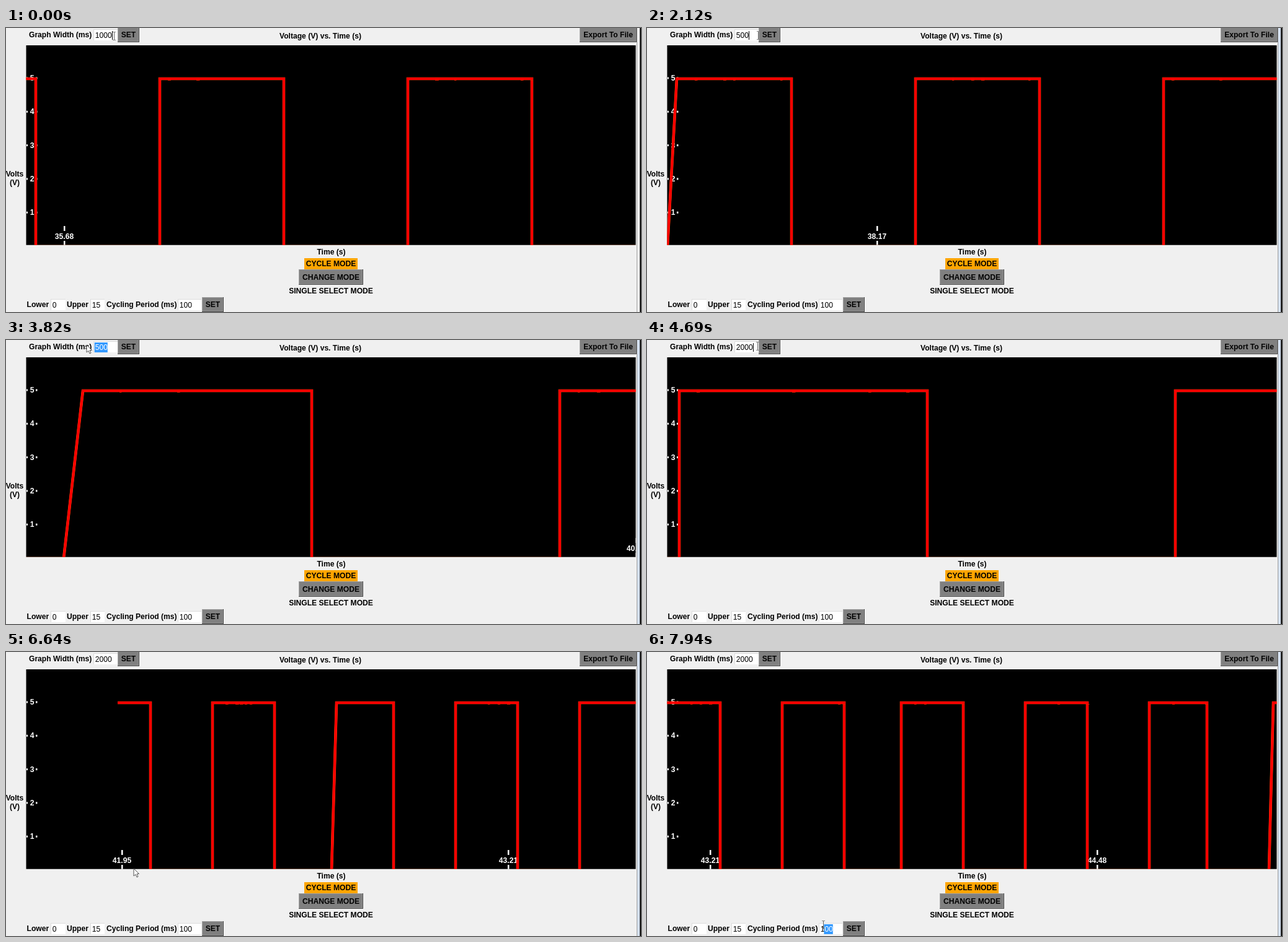
Animation of 1024x459 px, one loop 8 s. Source, as an HTML page with a canvas:

```html
<!DOCTYPE html>
<html lang="en">
<head>
<meta charset="utf-8">
<title>Voltage graph</title>
<style>
html, body { margin: 0; width: 100%; height: 100%; overflow: hidden; background: #f0f0f0; }
canvas { display: block; }
</style>
</head>
<body>
<canvas id="stage" width="1024" height="459"></canvas>
<script>
const c = document.getElementById('stage').getContext('2d');
const LOOP = 8000, RIGHT = 1015, TOP = 82, BASE = 353;
const SAMPLE = 1000 / 65;                 // ms between readings
const KEY = 85, TRAVEL = 460, DIGIT = 6.7;
const FONT = '12.1px "Liberation Sans", Arial, sans-serif';

// Key points: screen time, signal time at the right edge of the plot
const PROGRESS = [[0, 921], [1010, 1998], [2120, 3136], [3820, 4984],
  [5120, 6247], [5580, 6795], [6640, 7887], [7940, 9302]];

// Each edit selects the old width, types a new one, then SET clears the plot at signal time `from`.
const EDITS = [
  { text: '1000', drag: -900, type: -255, set: -100, from: -400 },
  { text: '500', drag: 350, type: 1500, set: 2490, from: 3546 },
  { text: '2000', drag: 3250, type: 3940, set: 5119, from: 6216 },
];

// Pointer stops, with the time of arrival
const FIELD = [174, 13], LEFT = [130, 8], SET = [190, 10];
const STOPS = [[0, FIELD], [800, LEFT], [1900, FIELD], [2400, SET], [3080, FIELD], [3680, LEFT],
  [4800, SET], [6640, [206, 350]], [7100, [300, 446]], [7940, [284, 441]]];

// Signal edges, falling first: 13 readings per half, with a few lost as the clock drifts.
const lost = i => i < 18 ? 0 : Math.max(2, Math.floor(.18 * i - 3.279));
const edges = Array.from({ length: 50 }, (_, i) => (13 * i - lost(i)) * SAMPLE - 46);
const isSloped = i => i % 12 === 11;
const isHigh = p => edges.filter(e => e <= p).length % 2 === 0;

const stamp = k => (Math.floor(3568.8 + 124.05 * k + .24 * k * k) / 100).toFixed(2);
const latest = (t, event) => EDITS.filter(e => e[event] <= t).pop();

// Screen time held to the recording's steps, and the signal time it shows
function progress(t) {
  const i = PROGRESS.findIndex(k => k[0] > t);
  if (i < 0) return PROGRESS[PROGRESS.length - 1];
  const [a, p] = PROGRESS[i - 1], [b, q] = PROGRESS[i];
  const steps = Math.round((b - a) / 63.5);
  const u = Math.floor((t - a) / (b - a) * steps + 1e-6) / steps;
  return [a + (b - a) * u, p + (q - p) * u];
}

function pointer(t) {
  const i = STOPS.findIndex(s => s[0] > t);
  if (i < 0) return STOPS[STOPS.length - 1][1];
  const [arrive, to] = STOPS[i], from = STOPS[i - 1][1];
  const u = Math.max(0, 1 - (arrive - t) / TRAVEL);
  return from.map((v, j) => v + (to[j] - v) * u * u * (3 - 2 * u));
}

function rect(x, y, w, h, color) {
  c.fillStyle = color;
  c.fillRect(x, y, w, h);
}

function text(s, x, y, align = 'left', color = '#000', weight = 'bold ') {
  c.font = weight + FONT;
  c.textAlign = align;
  c.fillStyle = color;
  c.fillText(s, x, y);
}

function button(label, x, y, w, h, pressed) {
  const [light, dark] = pressed ? ['#484848', '#a0a0a0'] : ['#a0a0a0', '#484848'];
  rect(x, y, w, h, dark);
  rect(x, y, w - 1, h - 1, light);
  rect(x + 1, y + 1, w - 2.5, h - 2.5, '#808080');
  text(label, x + w / 2, y + h / 2 + 4, 'center');
}

function entry(value, x, y, w) {
  rect(x, y, w, 18, '#dcdcdc');
  rect(x + 1, y + 1, w - 1, 17, '#fff');
  text(value, x + 2.7, y + 14, 'left', '#000', '');
}

// Highlights the digits between the pointer and the end of the value
function select(value, px, x, y) {
  const from = Math.max(0, Math.min(value.length, Math.round((px - x) / DIGIT)));
  const left = x + from * DIGIT;
  rect(left - 1, y, (value.length - from) * DIGIT + 1, 16, '#3399ff');
  text(value.slice(from), left, y + 12, 'left', '#fff', '');
}

function drawPlot(t, now) {
  const { text: span, from } = latest(t, 'set');
  const X = p => Math.round(RIGHT - (now - p) * 1000 / span);

  c.save();
  c.beginPath();
  c.rect(32.5, 28, 983, 322.7);
  c.clip();
  rect(32, 28, 984, 323, '#000');

  for (let v = 1; v <= 5; v++) {
    const y = 352.5 - v * 54.3;
    rect(33, y - 1.5, 2, 3, '#fff');
    rect(48, y - 1.5, 2.5, 3, '#fff');
    text(v, 42, y + 4, 'center', '#fff');
  }

  for (let k = 0; k < 8; k++) {
    const p = k * 81 * SAMPLE, x = X(p);
    if (p < from) continue;
    rect(x - 1, 320, 2.5, 8, '#fff');
    rect(x - 1, 344, 2.5, 8, '#fff');
    text(stamp(k), x, 341, 'center', '#fff');
  }

  let y = isHigh(from) ? TOP : BASE;
  c.beginPath();
  c.moveTo(X(from), y);
  edges.forEach((e, i) => {
    if (e <= from || e > now) return;
    c.lineTo(X(e), y);
    y = i % 2 ? TOP : BASE;
    c.lineTo(X(e + (isSloped(i) ? SAMPLE : 0)), y);
  });
  c.lineTo(RIGHT + 20, y);
  for (const [color, w] of [['#ff5a10', 4.5], ['#ff0000', 4]]) {
    c.strokeStyle = color;
    c.lineWidth = w;
    c.stroke();
  }

  // slight ripple under the high level
  for (let n = Math.ceil(Math.max(from, now - span) / SAMPLE); n * SAMPLE < now; n++) {
    const r = Math.abs(Math.sin(n * 12.9898) * 43758.5) % 1;
    if (r < .2 && isHigh(n * SAMPLE)) rect(X(n * SAMPLE) - 2, 84, 3 + r * 14, 1, '#e02000');
  }
  c.restore();
}

function drawArrow(x, y) {
  c.beginPath();
  [[0, 0], [0, 12], [3, 9.5], [5, 14], [7, 13], [5, 8.7], [8.5, 8.5]]
    .forEach(([dx, dy]) => c.lineTo(x + dx, y + dy));
  c.closePath();
  c.fillStyle = '#fff';
  c.fill();
  c.strokeStyle = '#555';
  c.lineWidth = 1;
  c.stroke();
}

function drawBeam(x, y) {
  x = Math.round(x);
  y = Math.round(y);
  rect(x, y - 6, 1, 12, '#666');
  rect(x - 2, y - 7, 5, 1, '#888');
  rect(x - 2, y + 6, 5, 1, '#888');
}

function drawWidthField(t, px) {
  const edit = latest(t, 'type');
  const value = edit.text.slice(0, 1 + Math.floor((t - edit.type) / KEY));
  const lastKey = edit.type + KEY * (edit.text.length - 1);
  entry(value, 141, 2, 39);
  if (EDITS.some(e => t > e.drag && t < e.type)) select(value, px, 143.7, 4);
  else if (t < 7500 && (t - lastKey) % 900 < 600) {
    rect(144 + Math.round(value.length * DIGIT), 5, 1, 14, '#000');
  }
}

function draw(time) {
  const [t, now] = progress(time);
  const [px, py] = pointer(t);

  rect(0, 0, 1024, 459, '#f0f0f0');
  rect(1017, 0, 1, 459, '#a0a0a0');
  if (t > 0) rect(1018, 0, 4, 459, '#d4e0f0');
  rect(1022, 0, 2, 459, '#181818');

  text('Graph Width (ms)', 37, 15);
  drawWidthField(t, px);
  button('SET', 180, -1, 35, 24, EDITS.some(e => t > e.set - 70 && t < e.set));
  text('Voltage (V) vs. Time (s)', 507, 17, 'center');
  button('Export To File', 925, -1, 92, 24);

  text('Volts', 14, 240, 'center');
  text('(V)', 14, 254, 'center');
  drawPlot(t, now);

  text('Time (s)', 524.5, 366, 'center');
  rect(481, 372, 86, 18, '#ffa500');
  text('CYCLE MODE', 524, 385, 'center');
  button('CHANGE MODE', 472, 390, 104, 25);
  text('SINGLE SELECT MODE', 524, 429, 'center');

  text('Lower', 33.5, 451);
  entry('0', 72, 438, 24);
  text('Upper', 98, 451);
  entry('15', 136, 438, 23);
  text('Cycling Period (ms)', 162, 451);
  entry('100', 277, 438, 38);
  if (t > 7560) select('100', px, 279.7, 440);
  button('SET', 316, 435, 35, 24);

  const overTop = px > 141 && px < 180 && py < 20;
  const overBottom = px > 277 && px < 315 && py > 438;
  (overTop || overBottom ? drawBeam : drawArrow)(px, py);
}

function frame(now) {
  draw(now % LOOP);
  requestAnimationFrame(frame);
}
requestAnimationFrame(frame);
</script>
</body>
</html>
```
